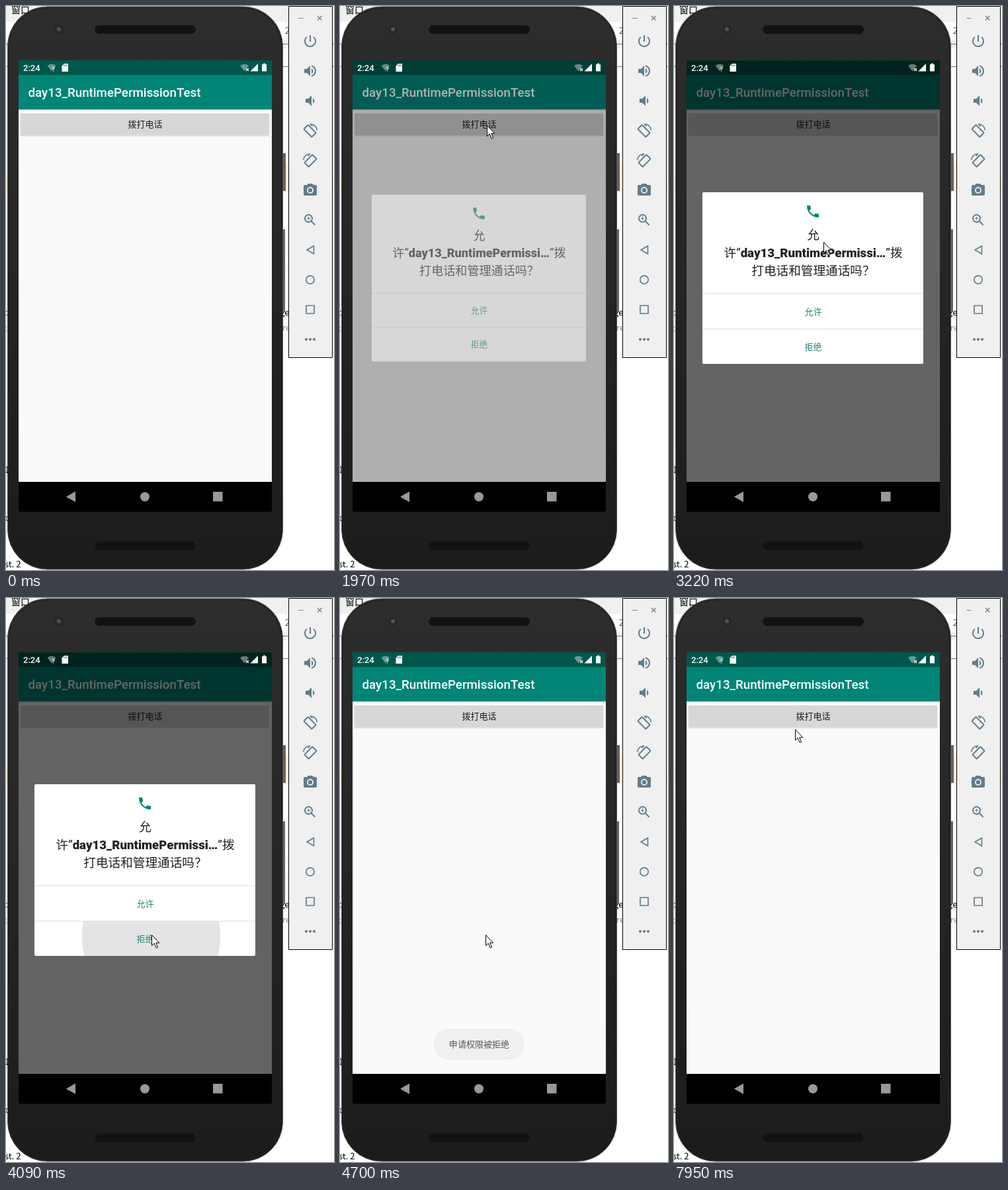
An HTML page that plays this animation: 496x851 px, repeating every 8000 ms.

```html
<!DOCTYPE html>
<html lang="zh-CN">
<head>
<meta charset="utf-8">
<title>Runtime permission</title>
<style>
html, body { margin: 0; width: 496px; height: 851px; overflow: hidden; background: #fff }
svg { display: block }
text { font: 13.05px Roboto, "Noto Sans CJK SC", "Noto Sans CJK", sans-serif }
.mid { text-anchor: middle }
.title { font-size: 18.64px }
.medium { font-weight: 500 }
.code text { font: 13px "Noto Sans CJK SC", "Noto Sans CJK", sans-serif }
.icons { fill: #607d8b }
.line { fill: none; stroke: #607d8b; stroke-width: 2 }
</style>
</head>
<body>
<svg width="496" height="851" viewBox="0 0 496 851">
  <defs>
    <linearGradient id="body" x2="0" y2="1">
      <stop stop-color="#2d2d2d"/><stop offset=".5" stop-color="#252525"/><stop offset="1" stop-color="#1c1c1c"/>
    </linearGradient>
    <pattern id="mesh" width="4" height="4" patternUnits="userSpaceOnUse">
      <path d="M0 0h4v4H0z" fill="#1d1d1d"/><path d="M0 0h2v2H0zM2 2h2v2H2z" fill="#060606"/>
    </pattern>
    <clipPath id="buttonClip"><rect x="22" y="162" width="376" height="33" rx="2"/></clipPath>
    <clipPath id="denyClip"><path d="M43 488h334v52H43z"/></clipPath>
    <g id="tilted" class="line">
      <rect x="-4.500" y="-8.500" width="9" height="17" rx="1" transform="translate(-.5 .5) rotate(-45)"/>
      <path d="M0-10a10.500 10.500 0 0 1 10.500 9.500M0-10l3.500 3.500" stroke-width="1.600"/>
    </g>
  </defs>

  <!-- desktop behind the phone -->
  <path d="M0 0h496v91H0z" fill="#f0f0f0"/>
  <path d="M0 24h496v27H0zM0 64h496v27H0z" fill="#fff"/>
  <path d="M0 57.500h496M0 91.500h496" stroke="#777"/>
  <path d="M0 258h4v23H0zM415 235h13v46h-13zM494 258h2v23h-2z" fill="#fdedd2"/>
  <g class="code">
    <text x="8" y="11" style="font-size:14px">窗口</text>
    <text x="422" y="42" fill="#555">2</text>
    <text x="-3" y="467" font-weight="700">t</text><text x="-5" y="491">c</text>
    <text x="-9" y="704">口</text><text x="-4" y="777">x</text><text x="-2" y="847">st. 2</text>
    <text x="414" y="467">ge</text><text x="418" y="490" fill="#888">re</text>
  </g>

  <!-- phone -->
  <path d="M417 222h6v57h-6zM417 337h5v125h-5z" fill="#686163"/>
  <rect x="2.500" y="1" width="416" height="849" rx="60" fill="url(#body)" stroke="#4a4a4a"/>
  <rect x="4.500" y="3" width="412" height="845" rx="58" fill="none" stroke="#1e1e1e"/>
  <rect x="134" y="29" width="153" height="13" rx="6.500" fill="url(#mesh)"/>
  <rect x="134" y="808" width="153" height="13" rx="6.500" fill="url(#mesh)"/>
  <circle cx="80" cy="35" r="5.500" fill="#333" stroke="#191919"/><circle cx="80" cy="35" r="2.500" fill="#555"/>

  <!-- app -->
  <path d="M19 82h383v681H19z" fill="#fafafa"/>
  <path d="M19 82h383v22H19z" fill="#00574b"/>
  <path d="M19 156h383v2H19z" fill="#dedede"/>
  <path d="M19 104h383v52H19z" fill="#008577"/>
  <text class="medium" x="33.500" y="137" fill="#fff" style="font-size:18.750px">day13_RuntimePermissionTest</text>
  <rect x="21.500" y="162" width="377" height="35" rx="2" fill="#e3e3e3"/>
  <rect x="22" y="162" width="376" height="33" rx="2" fill="#d6d7d7"/>
  <circle id="press" fill="#c8c8c8" clip-path="url(#buttonClip)"/>
  <text class="mid" x="210.500" y="183" fill="#1c1c1c">拨打电话</text>

  <path id="dim" d="M19 82h383v636H19z"/>
  <g fill="#fff">
    <text class="medium" x="26" y="98">2:24</text>
    <path d="M62.500 90q6.500-5 13 0l-6.500 8.500z" opacity=".4"/>
    <text class="medium" x="69.500" y="99" style="font-size:9px">?</text>
    <path d="M88 87h6v12H84.500V90.500z"/><path d="M87.500 89v2M89.500 88v3M91.500 88v3" stroke="#00574b" stroke-width=".8"/>
    <path d="M354 90q6.500-5 13 0l-6.500 8.500z" opacity=".4"/>
    <path d="m363 94 4 4m0-4-4 4" stroke="#fff" stroke-width="1.200"/>
    <path d="M381 87v11.500h-11.500z"/><path d="M387 88h2v-1.500h3V88h2v10.500h-7z"/>
  </g>

  <g id="dialog">
    <rect x="43" y="281" width="334" height="259" rx="2" fill="#fff"/>
    <path transform="translate(198 298)" fill="#008577" d="M6.620 10.790c1.440 2.830 3.760 5.140 6.590 6.590l2.200-2.200c.27-.27.67-.36 1.020-.24 1.120.37 2.330.57 3.570.57.55 0 1 .45 1 1V20c0 .55-.45 1-1 1-9.390 0-17-7.610-17-17 0-.55.45-1 1-1h3.500c.55 0 1 .45 1 1 0 1.250.2 2.450.57 3.570.11.35.03.74-.25 1.020z"/>
    <g class="mid" fill="#212121">
      <text class="title" x="210.500" y="351.500">允</text>
      <text class="title" x="210.500" y="378.500">许“<tspan font-weight="900">day13_RuntimePermissi…</tspan>”拨</text>
      <text class="title" x="210.500" y="405.500">打电话和管理通话吗？</text>
    </g>
    <circle id="ripple" cy="511" fill="#e4e4e4" clip-path="url(#denyClip)"/>
    <path d="M43 434h334M43 487.500h334" stroke="#dedede"/>
    <g class="mid" fill="#1c8679">
      <text x="210.500" y="465.500">允许</text><text x="210.500" y="518.500">拒绝</text>
    </g>
  </g>

  <g id="toast">
    <rect x="141.500" y="650" width="137" height="46" rx="23" fill="#e9e9e9"/>
    <rect x="142" y="650" width="136" height="45" rx="22.500" fill="#f0f0f0"/>
    <text class="mid" x="210.500" y="678" fill="#555">申请权限被拒绝</text>
  </g>

  <path d="M19 718h383v45H19z"/>
  <path d="M91 740.500l14-8v16zM313 733h14.500v14.500H313z" fill="#999"/>
  <circle cx="210" cy="740.500" r="7" fill="#999"/>

  <!-- emulator toolbar -->
  <path d="M427.500.5h66v530h-66z" fill="#f0f0f0" stroke="#000"/>
  <path d="M442.500 18.500h7M471 15l6.500 6.500m0-6.500-6.500 6.500" stroke="#777" stroke-width="1.200"/>
  <g class="icons">
    <path transform="translate(448 41)" d="M13 3h-2v10h2zM17.830 5.170l-1.420 1.420C17.990 7.860 19 9.810 19 12c0 3.870-3.130 7-7 7s-7-3.130-7-7c0-2.190 1.010-4.140 2.580-5.420L6.170 5.170C4.230 6.820 3 9.260 3 12c0 4.970 4.030 9 9 9s9-4.030 9-9c0-2.740-1.230-5.180-3.170-6.830z"/>
    <path transform="translate(448 86)" d="M3 9v6h4l5 5V4L7 9zM16.500 12c0-1.770-1.020-3.290-2.500-4.030v8.050c1.480-.73 2.500-2.250 2.500-4.020zM14 3.230v2.060c2.890.86 5 3.540 5 6.710s-2.110 5.850-5 6.710v2.060c4.010-.91 7-4.490 7-8.770s-2.990-7.860-7-8.770z"/>
    <path transform="translate(448 131)" d="M18.500 12c0-1.770-1.020-3.290-2.500-4.030v8.050c1.480-.73 2.500-2.250 2.500-4.020zM5 9v6h4l5 5V4L9 9z"/>
    <use href="#tilted" x="460" y="188"/>
    <use href="#tilted" transform="matrix(-1 0 0 1 460 233)"/>
    <path transform="translate(448 266)" d="M9 2 7.170 4H4c-1.100 0-2 .9-2 2v12c0 1.100.9 2 2 2h16c1.100 0 2-.9 2-2V6c0-1.100-.9-2-2-2h-3.170L15 2z"/>
    <circle cx="460" cy="278" r="4.100" fill="none" stroke="#f0f0f0" stroke-width="1.800"/>
    <circle cx="454" cy="503" r="2"/><circle cx="460" cy="503" r="2"/><circle cx="466" cy="503" r="2"/>
  </g>
  <g class="line">
    <circle cx="457.500" cy="320.500" r="5.500"/>
    <path d="m461.500 324.500 6 6"/><path d="M455 320.500h5m-2.500-2.500v5" stroke-width="1.200"/>
    <path d="M455 368l10.500-6v12z" stroke-width="1.600"/>
    <circle cx="460" cy="413" r="6.200" stroke-width="1.700"/>
    <path d="M454 452h12v12h-12z" stroke-width="1.700"/>
  </g>

  <path id="cursor" d="M.5.500v16l3.700-3.500 3 7 2.500-1-3-6.700h5z" fill="#fff" stroke="#000"/>
</svg>
<script>
const LOOP = 8000;
const $ = id => document.getElementById(id);
const clamp = v => Math.max(0, Math.min(1, v));
const ramp = (t, from, to) => clamp((t - from) / (to - from));
const mix = (a, b, k) => a + (b - a) * k;
const set = (id, attrs) => { for (const k in attrs) $(id).setAttribute(k, attrs[k]); };

const bursts = [
  [290, 1060, 11], [1120, 1360, 4], [1890, 2120, 4], [2830, 3600, 11], [3850, 4630, 11],
  [4700, 5250, 8], [5480, 5710, 4], [5940, 6720, 11], [6800, 7260, 7], [7410, 7720, 5], [7950, 8000, 2]
];
function recorded(t) {
  const burst = bursts.findLast(b => b[0] <= t);
  if (!burst) return 0;
  const [start, end, count] = burst, step = (end - start) / (count - 1);
  return Math.min(end, start + Math.floor((t - start + 8) / step) * step);
}

// Pointer path: time, x, y
const path = [
  [290, 370, 758], [520, 300, 520], [750, 225, 260], [900, 207, 162], [1060, 222, 180],
  [2830, 222, 180], [3200, 226, 350], [3600, 220, 508],
  [4700, 220, 508], [5250, 241, 675], [5480, 243, 680], [5710, 273, 741],
  [5900, 273, 741], [6175, 397, 838], [6330, 390, 832], [6564, 331, 752], [6720, 326, 749],
  [6780, 322, 735], [7030, 235, 390], [7260, 184, 200], [7410, 183, 198]
];
function pointer(t) {
  const i = path.findIndex(p => p[0] > t);
  if (i < 0) return path.at(-1).slice(1);
  const a = path[i - 1], b = path[i], k = ramp(t, a[0], b[0]);
  return [Math.round(mix(a[1], b[1], k)), Math.round(mix(a[2], b[2], k))];
}

function draw(time) {
  const t = recorded(time);

  set("cursor", { visibility: t < 290 ? "hidden" : "visible" });
  if (t >= 290) set("cursor", { transform: `translate(${pointer(t)})` });

  const second = t >= 7400;
  const grow = second ? ramp(t, 7330, 7640) : ramp(t, 1050, 1360);
  const release = second ? +(t >= 7950) : ramp(t, 1810, 2120);
  set("press", {
    cx: mix(second ? 183 : 222, 210, grow), cy: 179, r: grow && mix(60, 200, grow),
    opacity: clamp(grow * 2) * (1 - release)
  });

  const shown = ramp(t, 1820, 2110) * (1 - ramp(t, 4170, 4390));
  const scale = t < 2120 ? mix(.94, 1, shown) : 1;
  set("dim", { opacity: .6 * shown });
  set("dialog", {
    opacity: shown,
    transform: `translate(210 410) scale(${scale}) translate(-210 -410)`
  });
  const touch = ramp(t, 3800, 4350);
  set("ripple", { cx: mix(220, 219, touch), r: touch && mix(45, 161, touch), opacity: clamp(touch * 4) });

  set("toast", { opacity: ramp(t, 4310, 4630) * (1 - ramp(t, 6420, 6660)) });
}

function frame() {
  draw(performance.now() % LOOP);
  requestAnimationFrame(frame);
}
frame();
</script>
</body>
</html>
```
